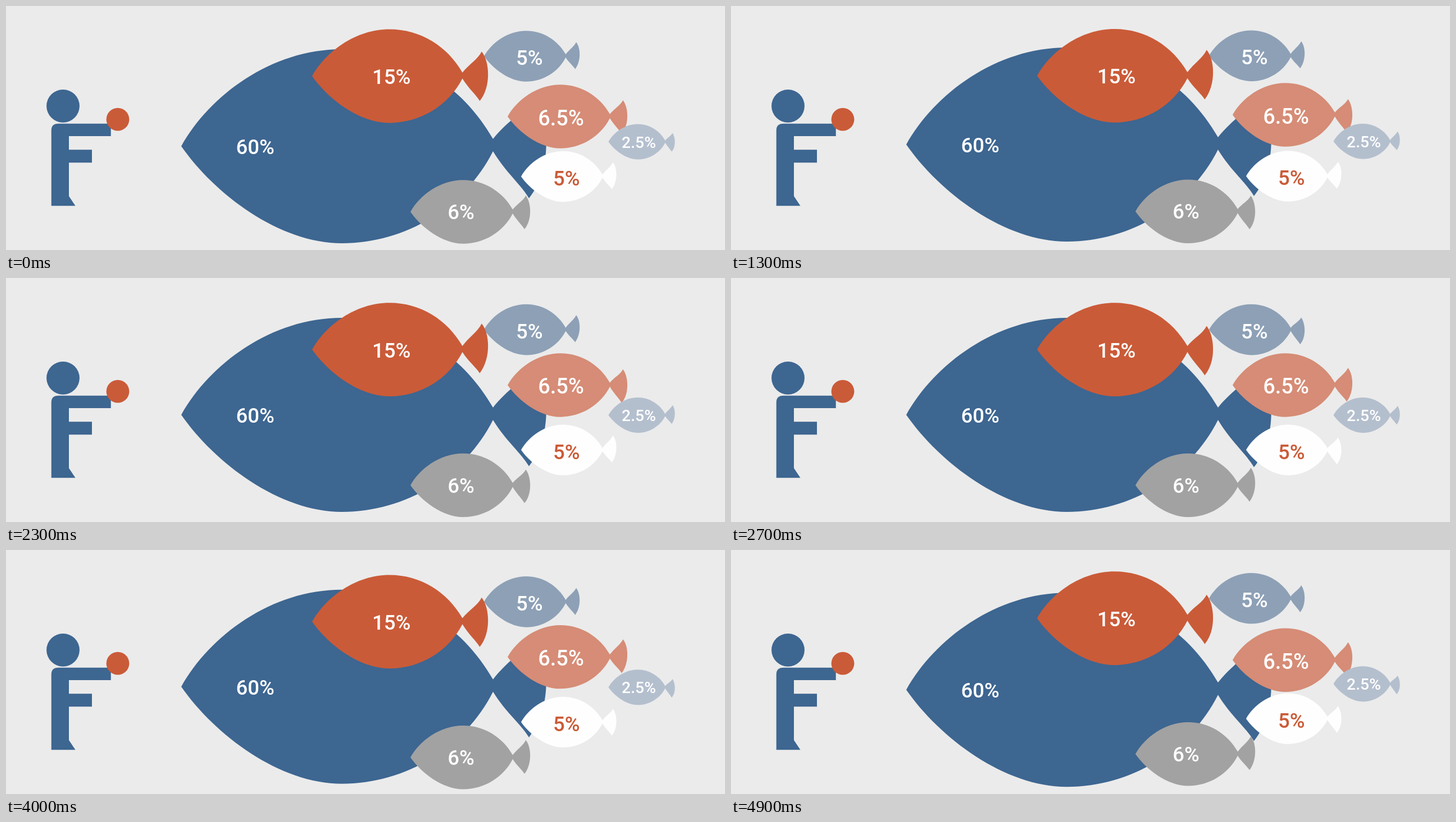
An HTML page with a canvas for the animation above (5000 ms loop, 1280 px wide and 435 px high).

```html
<!DOCTYPE html>
<html lang="en">
<head>
<meta charset="utf-8">
<title>Fish shares</title>
<style>
  html, body { margin: 0; width: 100%; height: 100%; overflow: hidden; background: #ebebeb; }
  canvas { display: block; width: 1280px; height: 435px; }
</style>
</head>
<body>
<canvas id="stage"></canvas>
<script>
const W = 1280, H = 435, LOOP = 5000, STEP = 100;
const BG = '#ebebeb', BLUE = '#3d6691', ORANGE = '#ca5b38', WHITE = '#fefefe';

const canvas = document.getElementById('stage');
const ctx = canvas.getContext('2d');
const ratio = window.devicePixelRatio || 1;
canvas.width = W * ratio;
canvas.height = H * ratio;

// Vertical drift at every sixth of the loop; the two schools move in antiphase.
const HEAVY = [0, -6.7, -0.4, -7, -0.4, -7, -0.4];
const LIGHT = [0, 3.5, -3.5, 3.5, -3.5, 3.5, -3.5];

// wag: tip travel in px, phase in s, travel at the start of the loop
const fishes = [
  { x: 312, y: 250, s: 1, color: BLUE, drift: HEAVY, wag: [2, 0.58, 0.7],
    text: '60%', tx: 443.7, ty: 264, size: 36.5 },
  { x: 851, y: 89.5, s: 0.262, color: '#8da0b6', drift: LIGHT, wag: [2.2, 0.7, -1.2],
    text: '5%', tx: 931.7, ty: 105, size: 36.5 },
  { x: 545, y: 125, s: 0.482, color: ORANGE, drift: LIGHT, wag: [2.2, 0.8, 0],
    text: '15%', tx: 686.2, ty: 139, size: 36.5 },
  { x: 893, y: 197, s: 0.328, color: '#d68c76', drift: HEAVY, wag: [1.9, 0.38, 0.8],
    text: '6.5%', tx: 988, ty: 212.5, size: 38 },
  { x: 1072.5, y: 242, s: 0.182, color: '#b4bfce', drift: LIGHT, wag: [1.8, 0.95, 1],
    text: '2.5%', tx: 1126.5, ty: 252.5, size: 28.3 },
  { x: 917, y: 304, s: 0.261, color: WHITE, drift: LIGHT, wag: [1.8, 0.77, -1.5],
    text: '5%', tx: 997.7, ty: 320, size: 36.5, ink: ORANGE },
  { x: 720, y: 367, s: 0.328, color: '#a2a2a2', drift: LIGHT, wag: [1.75, 0.35, 0.7],
    text: '6%', tx: 810, ty: 380, size: 36.5 }
];

const ease = u => (1 - Math.cos(Math.PI * Math.min(u, 1))) / 2;

function driftAt(keys, t) {
  const u = t / LOOP * 6, i = Math.floor(u);
  return keys[i] + (keys[i + 1] - keys[i]) * ease(u - i);
}

function wagAt([travel, phase, start], t) {
  const s = t / 1000, w = ease(s / 0.5);
  return start * (1 - w) + travel * w * Math.cos(2 * Math.PI * (s - phase));
}

// Nose at the origin; the tail is sheared about the neck.
function fishPath(shear) {
  const neck = 555;
  const p = new Path2D();
  const tail = (...c) => {
    for (let i = 0; i < c.length; i += 2) c[i + 1] += shear * (c[i] - neck);
    p.bezierCurveTo(...c);
  };
  p.moveTo(0, 0);
  p.bezierCurveTo(50, -90, 160, -173, 286, -173);
  p.bezierCurveTo(400, -173, 500, -110, neck, -13);
  tail(580, -45, 612, -62, 626, -91);
  tail(656, -55, 662, 40, 619, 92);
  tail(605, 68, 578, 47, neck, 9);
  p.bezierCurveTo(505, 108, 400, 173, 286, 173);
  p.bezierCurveTo(175, 173, 60, 86, 0, 0);
  p.closePath();
  return p;
}

function drawFish(f, t) {
  ctx.save();
  ctx.translate(0, driftAt(f.drift, t));
  ctx.save();
  ctx.translate(f.x, f.y);
  ctx.scale(f.s, f.s);
  ctx.fillStyle = f.color;
  ctx.fill(fishPath(wagAt(f.wag, t) / (67 * f.s)));
  ctx.restore();
  ctx.fillStyle = f.ink || '#fff';
  ctx.font = `500 ${f.size}px Roboto, sans-serif`;
  ctx.textAlign = 'center';
  ctx.fillText(f.text, f.tx, f.ty);
  ctx.restore();
}

function disc(x, y, r, color) {
  ctx.fillStyle = color;
  ctx.beginPath();
  ctx.arc(x, y, r, 0, 2 * Math.PI);
  ctx.fill();
}

function drawPerson() {
  disc(101.5, 178.3, 29.4, BLUE);
  ctx.beginPath();
  ctx.moveTo(80.7, 356.3);
  ctx.lineTo(80.7, 222);
  ctx.quadraticCurveTo(80.7, 209.7, 93, 209.7);
  const edge = [[186.7, 209.7], [186.7, 232], [112, 232], [112, 256.3], [153, 256.3],
    [153, 279.2], [112, 279.2], [112, 339], [123.5, 356.3]];
  edge.forEach(([x, y]) => ctx.lineTo(x, y));
  ctx.fill();
  disc(199, 202.2, 20.4, ORANGE);
}

function draw(now) {
  const t = Math.floor((now % LOOP) / STEP) * STEP;
  ctx.setTransform(ratio, 0, 0, ratio, 0, 0);
  ctx.fillStyle = BG;
  ctx.fillRect(0, 0, W, H);
  drawPerson();
  fishes.forEach(f => drawFish(f, t));
}

const begin = performance.now();
function tick() {
  draw(performance.now() - begin);
  requestAnimationFrame(tick);
}
tick();
</script>
</body>
</html>
```
